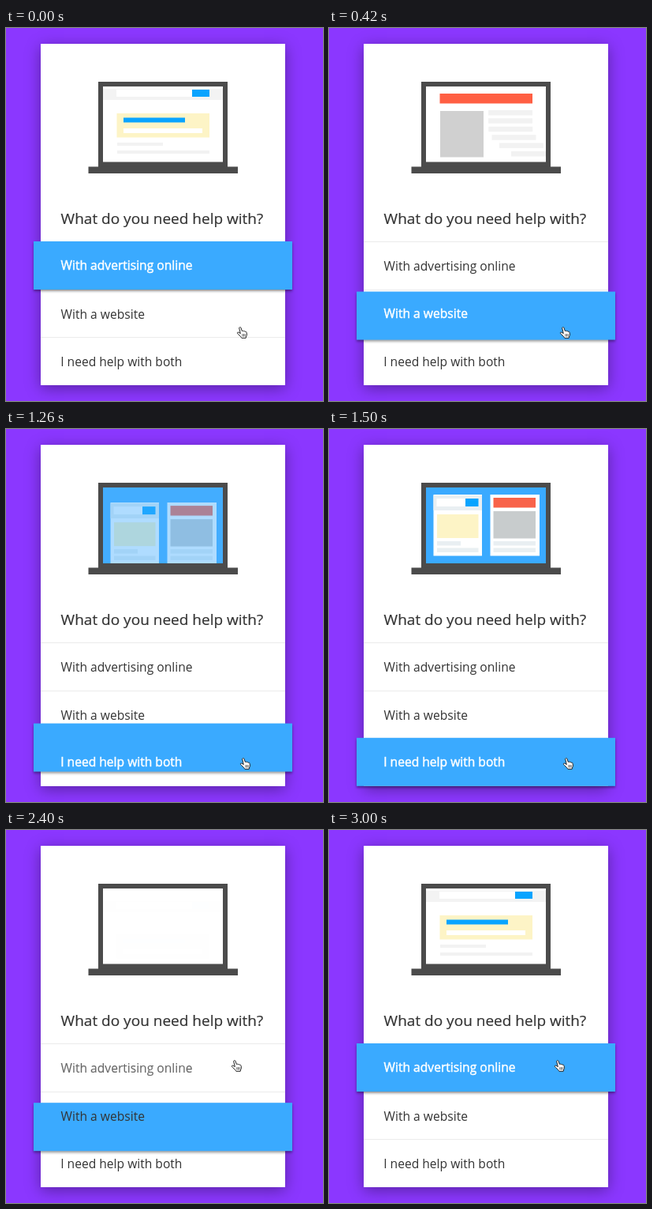
Recreate the animation shown at these times as an HTML page. Size 402x472 px, loop 3300 ms.

```html
<!DOCTYPE html>
<html lang="en">
<head>
<meta charset="utf-8">
<title>Help picker</title>
<style>
  html, body { margin: 0; width: 100%; height: 100%; overflow: hidden; background: #8b37ff; }
  body { position: relative; }
  .card, .bar, svg { position: absolute; }
  .card { left: 44px; top: 20px; width: 310px; height: 431.5px; background: #fff;
    box-shadow: 0 4px 18px rgba(0, 0, 0, .36); }
  .card i { position: absolute; left: 0; width: 100%; height: 1px; background: #ebebeb; }
  .bar { left: 35px; top: 270.3px; width: 328px; height: 60.4px; background: #3aaaff;
    box-shadow: 0 2px 3px rgba(0, 0, 0, .4); }
  svg { left: 0; top: 0; width: 402px; height: 472px; }
  text { font-family: "Open Sans", "Noto Sans", sans-serif; fill: #333; }
  .title { font-size: 19px; stroke: #333; stroke-width: .2px; }
  .item { font-size: 15.6px; stroke-width: 0; }

  /* One loop is 3300 ms, so 1% is 33 ms */
  .bar, .item, .ad, .web, .both, .hand { animation: 3.3s linear infinite backwards; }

  .bar { animation-name: bar; }
  @keyframes bar {
    0% { transform: none; animation-timing-function: cubic-bezier(.55, 0, .55, 1.4); }
    16.36% { transform: translateY(60.4px); }
    29.09% { transform: translateY(60.4px); animation-timing-function: cubic-bezier(.55, 0, .55, 1.4); }
    45.45% { transform: translateY(120.8px); }
    65.15% { transform: translateY(120.8px); animation-timing-function: cubic-bezier(.55, 0, .55, 1.4); }
    83.33%, 100% { transform: none; }
  }

  .item { --on: #fff; }
  .item:nth-of-type(2) { animation-name: label1; }
  .item:nth-of-type(3) { animation-name: label2; }
  .item:nth-of-type(4) { animation-name: label3; }
  @keyframes label1 {
    0%, 4.5%, 75%, 100% { fill: #fff; stroke: #fff; stroke-width: .45px; transform: translateY(-.8px); }
    9%, 72% { fill: #333; stroke: #333; stroke-width: 0px; transform: none; }
  }
  @keyframes label2 {
    0%, 4.5%, 37.6%, 100% { fill: #333; stroke: #333; stroke-width: 0px; transform: none; }
    9%, 33.6% { fill: #fff; stroke: #fff; stroke-width: .45px; transform: translateY(-.8px); }
  }
  @keyframes label3 {
    0%, 33.6%, 72.7%, 100% { fill: #333; stroke: #333; stroke-width: 0px; transform: none; }
    37.6%, 69.4% { fill: #fff; stroke: #fff; stroke-width: .45px; transform: translateY(-.8px); }
  }

  .ad { animation-name: ad, adFade; }
  @keyframes ad {
    0% { transform: none; animation-timing-function: ease-in; }
    5% { transform: translateY(calc(var(--d) * -1)); }
    5.1%, 73.3% { transform: translateY(var(--d)); animation-timing-function: ease-in-out; }
    87.3%, 100% { transform: none; }
  }
  @keyframes adFade {
    0%, 100% { opacity: 1; }
    5%, 72.7% { opacity: 0; }
    81.2% { opacity: 1; }
  }

  .head { animation-name: head; }
  @keyframes head {
    0%, 5% { opacity: 0; transform: translateY(20px); animation-timing-function: ease-out; }
    12.4%, 29.1% { opacity: 1; transform: none; }
    30.9% { opacity: 1; transform: translateY(-6px); }
    33.3% { opacity: 0; transform: translateY(-12px); }
    100% { opacity: 0; transform: translateY(-12px); }
  }
  .pic { animation-name: pic; transform-box: fill-box; transform-origin: center; }
  @keyframes pic {
    0%, 5.5% { opacity: 0; transform: scale(.8); animation-timing-function: ease-out; }
    12.4%, 29.1% { opacity: 1; transform: none; }
    30.9% { opacity: .75; transform: scale(.96); }
    34.5%, 100% { opacity: 0; transform: scale(.85); }
  }
  .row { animation-name: row; animation-delay: calc(var(--i) * 42ms); }
  @keyframes row {
    0%, 3.9% { opacity: 0; transform: translateX(72px); }
    3.94% { opacity: 1; transform: translateX(72px); animation-timing-function: cubic-bezier(.333, .667, .667, 1); }
    10.6%, 29.55% { opacity: 1; transform: none; }
    30.75%, 100% { opacity: 0; transform: none; }
  }

  .sky { animation-name: sky; }
  @keyframes sky {
    0%, 32.1%, 68.55%, 100% { opacity: 0; }
    38.5%, 63.64% { opacity: 1; }
  }
  .thumb { animation-name: thumb; }
  @keyframes thumb {
    0%, 34.5% { opacity: 0; transform: translateY(24px); animation-timing-function: ease-out; }
    43.6%, 63% { opacity: 1; transform: none; }
    66.7%, 100% { opacity: 0; transform: translateY(-6px); }
  }

  .hand { animation-name: hand; }
  @keyframes hand {
    0%, 18.2% { transform: none; animation-timing-function: ease-in-out; }
    29.4% { transform: translate(4px, 38px); }
    57.6% { transform: translate(4px, 38px); animation-timing-function: ease-in-out; }
    65.8%, 100% { transform: translate(-7px, -87px); }
  }
</style>
</head>
<body>
<div class="card">
  <i style="top:250px"></i><i style="top:311px"></i><i style="top:371px"></i>
</div>
<div class="bar"></div>
<svg viewBox="0 0 402 472">
  <clipPath id="screen"><path d="M123 74h152v95.5H123z"/></clipPath>
  <g fill="#4b4b4b">
    <path d="M117 68h164v108H117z"/>
    <path d="M104.5 175.5H294v8.5H104.5z"/>
  </g>
  <g clip-path="url(#screen)">
    <path fill="#fff" d="M123 74h152v96H123z"/>

    <g class="ad" style="--d:13px">
      <path fill="#f3f3f3" d="M123 77h152v14H123z"/>
      <path fill="#fff" d="M140 78h96v9h-96z"/>
      <path fill="#08a4ff" d="M236 78h22v9h-22z"/>
    </g>
    <g class="ad" style="--d:24px">
      <path fill="#fdf4c6" d="M140.5 108H258v30.5H140.5z"/>
      <path fill="#08a4ff" d="M149 113.5h78v6h-78z"/>
      <path fill="#fff" d="M149 127h100v6H149z"/>
    </g>
    <g class="ad" style="--d:25px" fill="#f2f2f2">
      <path d="M141 145h58v4h-58z"/>
      <path d="M141 155h117v4H141z"/>
    </g>

    <path class="web head" fill="#ff5f43" d="M140.5 83H258v12.5H140.5z"/>
    <path class="web pic" fill="#d0d0d0" d="M141 105h55v58.5h-55z"/>
    <g fill="#f2f2f2">
      <path class="web row" style="--i:0" d="M202 104h56v6.5h-56z"/>
      <path class="web row" style="--i:1" d="M202 114.3h56v6.5h-56z"/>
      <path class="web row" style="--i:2" d="M202 124.8h56v6.5h-56z"/>
      <path class="web row" style="--i:3" d="M202 135.2h56v6.5h-56z"/>
      <path class="web row" style="--i:4" d="M202 145.5h56v6.5h-56z"/>
      <path class="web row" style="--i:5" d="M202 156h56v6.5h-56z"/>
    </g>

    <path class="both sky" fill="#3aaaff" d="M123 74h152v96H123z"/>
    <g class="both thumb">
      <path fill="#fff" d="M132.5 83H194v77.5h-61.5zM204.5 83H267v77.5h-62.5z"/>
      <path fill="#e9eff2" d="M132.5 84H194v19h-61.5zM137 142h30v5.5h-30zM137 150.5h52.5v5.5H137zM208.5 142H262v5.5h-53.5zM208.5 150.5H262v5.5h-53.5z"/>
      <path fill="#fff" d="M136.5 88H173v10h-36.5z"/>
      <path fill="#08a4ff" d="M173 88h16.500v10H173z"/>
      <path fill="#fdf4c6" d="M137 108h52.500v30H137z"/>
      <path fill="#f8634a" d="M208.500 87H262v12.500h-53.500z"/>
      <path fill="#c8cccd" d="M208.500 104H262v34.500h-53.500z"/>
    </g>
  </g>

  <text class="title" x="69.600" y="248">What do you need help with?</text>
  <text class="item" x="69.600" y="307">With advertising online</text>
  <text class="item" x="69.600" y="367.600">With a website</text>
  <text class="item" x="69.200" y="428">I need help with both</text>

  <g class="hand">
    <g transform="translate(292.500 377.500)" stroke="#222" stroke-linejoin="round" stroke-linecap="round">
      <path fill="#fff" d="M3.300 1.700c.6-1 1.900-.8 2.200.3L6.800 6c.5-.7 1.700-.5 2 .3.600-.6 1.700-.4 1.900.5.800-.4 1.800 0 1.900 1l.3 2.700c0 1.400-.7 2-1 3l-.2 1.300H6.300l-.6-1C4.700 12.200 2.400 10.500 1 9c-.6-.9.400-1.900 1.500-1.400l2 1.300z"/>
      <path fill="none" stroke-width=".7" d="M7.300 10v2.600M9 10v2.600M10.700 10v2.600"/>
    </g>
  </g>
</svg>
</body>
</html>
```
